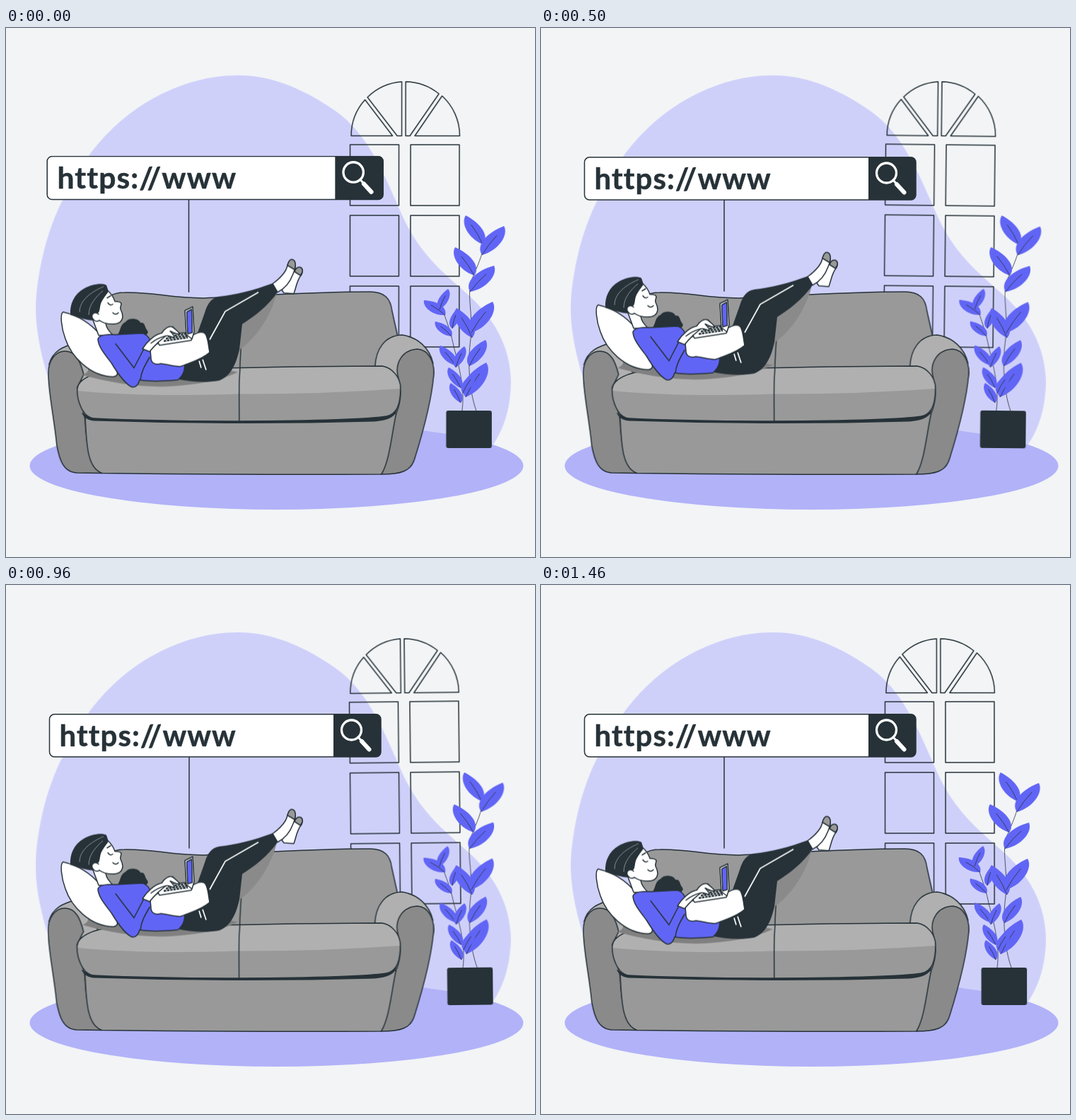
Animation of 748x748 px, one loop 1.5 s. Source, as an HTML page:

```html
<!DOCTYPE html>
<html lang="en">
<head>
<meta charset="utf-8">
<title>Browsing on the sofa</title>
<style>
  html, body { margin: 0; width: 100%; height: 100%; overflow: hidden; background: #f2f4f6; }
  svg { display: block; width: 100vw; height: 100vh; }

  .ink { stroke: #263238; stroke-width: 1.5; stroke-linejoin: round; stroke-linecap: round; }
  .none { fill: none; }
  .dark { fill: #263238; }
  .white { fill: #fff; }
  .violet { fill: #6165f5; }
  .grey { fill: #999; }
  .pale { fill: #b0b0b0; }
  .side { fill: #8a8a8a; }
  .shade { fill: #808080; }
  .vein { fill: none; stroke: #263238; stroke-width: .8; }
  .url { font: 700 42px Lato, "Open Sans", sans-serif; letter-spacing: 1.1px; font-variant-ligatures: none; fill: #263238; stroke: #263238; stroke-width: .5; stroke-linejoin: round; }

  .shake, .float, .beat, .sway { animation: 1.5s linear -20ms infinite; }
  .shake { animation-name: shake; }
  .float { animation-name: float; }
  .beat { animation-name: beat; transform-origin: 296px 277px; }
  .sway { animation-name: sway; }
  #window { transform-origin: 564px 264px; }
  #plant { transform-origin: 647px 430px; }

  @keyframes shake {
    0%, 100% { transform: translateX(0); }
    10%, 90% { transform: translateX(-1.5px); }
    20%, 80% { transform: translateX(3px); }
    30%, 50%, 70% { transform: translateX(-6px); }
    40%, 60% { transform: translateX(6px); }
  }
  @keyframes float {
    0%, 100% { transform: translateY(0); }
    50% { transform: translateY(-15px); }
  }
  @keyframes beat {
    0%, 30%, 40%, 60%, 100% { transform: scale(1); }
    10%, 50% { transform: scale(1.1); }
  }
  @keyframes sway {
    0%, 100% { transform: rotate(0deg); }
    25% { transform: rotate(1deg); }
    75% { transform: rotate(-1deg); }
  }
</style>
</head>
<body>
<svg viewBox="0 0 748 748">
  <path class="shake" fill="#cfd0fa" d="M327 67C377 66 426 89 467 118C515 152 538 215 559 262C584 318 615 343 650 374C690 408 714 452 714 500C714 540 703 570 685 595L110 600C70 540 43 460 42 395C44 345 58 285 82 240C90 223 100 205 112 188C165 110 250 67 327 67Z"/>
  <ellipse cx="382.5" cy="619" rx="349" ry="62" fill="#b1b2f8"/>

  <g id="window" class="sway ink none">
    <path d="M488 152.5A76.5 76.5 0 0 1 507.5 101.5L546.5 152.5Z
      M511 98A76.5 76.5 0 0 1 559.5 76V152.5H553Z
      M565 76A76.5 76.5 0 0 1 612 93L571 152.5H565Z
      M616.5 96A76.5 76.5 0 0 1 641.5 152.5H578Z"/>
  </g>

  <g class="beat">
    <path class="ink none" d="M259 243V372"/>
    <rect class="ink white" x="61.5" y="182.8" width="468.5" height="60.2" rx="7"/>
    <path class="dark" d="M463 182.8H523Q530 182.8 530 190V236Q530 243 523 243H463Z"/>
    <text class="url" x="75.5" y="227.5">https://www</text>
    <g fill="none" stroke="#fff" stroke-linecap="round">
      <circle cx="488.5" cy="205" r="14" stroke-width="3.3"/>
      <path d="M498 215L504 222" stroke-width="3"/>
      <path d="M503 221L513.5 232.5" stroke-width="6"/>
    </g>
  </g>

  <g id="plant" class="sway">
    <path class="vein" d="M665 541C654 510 653 470 657 440C661 400 649 372 661 350C669 330 677 315 675 295"/>
    <path class="vein" d="M645 541C649 510 641 480 633 450C627 420 619 408 615 388"/>
    <rect class="dark" x="622.5" y="541" width="64.5" height="53" rx="3"/>
  </g>

  <g class="shake">
    <path class="ink grey" d="M110 500L135 400C140 380 150 374 168 374C210 373 230 382 280 382C350 379 430 373 515 373C535 373 544 382 546 400L554 436L556 490Z"/>
    <path class="ink pale" d="M61 476C66 456 82 450 100 445C112 452 125 470 130 488L105 500Z"/>
    <path class="ink pale" d="M522 479C523 455 535 435 560 434C582 437 599 452 604 474L590 500L556 500Z"/>
    <path class="ink side" d="M60 488C60 470 70 457 84 457C100 457 106 474 110 490L101 508C103 530 112 545 112 555C114 590 118 620 136 629.5L100 629C82 628 76 612 72 590C68 550 60 515 60 488Z"/>
    <path class="ink grey" d="M112 548C114 585 114 622 136 629.5Q330 632 531 631C542 618 547 580 552 545Z"/>
    <path class="ink side" d="M555 495C549 475 560 455 582 454C598 455 606 472 605 490C602 527 588 577 578 609C573 627 558 631 531 631C543 612 546 570 552 545C560 525 559 508 555 495Z"/>
    <path class="dark" d="M107 544C111 552 117 555 125 555.5Q330 562 520 556.5C540 555 552 550 553 538L545 547Q520 553 330 555L125 552Z"/>
    <path id="seat" class="grey" d="M101 510C102 496 125 487 150 484C240 483 390 478 532 478C546 480 558 494 558 509C558 530 554 546 538 549Q500 555 330 556Q210 556 125 552C108 551 100 525 101 510Z"/>
    <path class="pale" d="M101 513C102 496 125 487 150 484C240 483 390 478 532 478C546 480 557 494 558 510Q445 518 330 517.5Q200 522 101 513Z"/>
    <use href="#seat" class="ink" fill-opacity="0"/>
    <path class="ink none" d="M334 390C335 430 331 460 331 483C329 505 330 530 330 556"/>
  </g>

  <g class="float">
    <path class="shade" d="M108 465C117 478 121 486 108 491C150 503 200 510 240 506.5C270 504 300 500 328 487L250 470Z"/>
    <path class="side" d="M383 374C378 398 358 438 326 458L330 405Z"/>
    <path class="ink white" d="M81 402C76 404 78 424 84 440C92 464 118 493 152 493.5C160 492 158 487 154 478L133 434C118 416 98 406 81 402Z"/>

    <path class="dark" d="M158 434C163 426 161 420 169 416C174 409 188 411 190 417C197 416 196 423 199 427C204 432 197 437 192 433L180 440Z"/>
    <path class="ink white" d="M121 408L131 435L152 435C146 430 142 425 141 418L146 412Z"/>
    <path class="ink white" d="M128 375L143 371C149 376 152 381 154 387C158 387 162 387 163 390C163 393 161 395 162 398C164 402 165 405 165 409C164 416 158 419 151 419C144 419 136 417 131 413L122 404Z"/>
    <path class="dark" d="M91 406C90 391 96 377 110 369C120 363 136 360 142 364L145 373C141 379 134 386 133 395C132 402 131 405 127 403C121 402 121 409 125 414C114 414 101 409 91 406Z"/>
    <path d="M104 402C104 386 119 374 138 366M117 406C117 391 128 380 137 372" fill="none" stroke="#8a8f93" stroke-width="1"/>
    <path class="ink white" d="M131 405C126 401 120 404 122 410C124 415 128 416 132 414"/>
    <path class="ink none" d="M144 389C146 392 148 393 151 391M143 382L148 379M151 403C154 406 157 405 159 403"/>

    <path class="dark" d="M250 474L243 497C262 501 284 502 301 499C316 494 325 478 330 455L334 419C350 409 370 394 384 374L378 361C351 371 323 378 302 380C290 382 285 390 281 403L270 434L286 445Z"/>
    <path d="M288 441L310 401L357 374M273 471L276 481M278 469L283 484" fill="none" stroke="#fff" stroke-width="1.7"/>
    <path class="ink white" d="M390 371L393 375L407 376C411 365 411 357 418 349C421 342 418 337 413 339C408 341 405 347 402 354Z"/>
    <path class="ink grey" d="M408 345C410 339 414 337 418 340C420 343 419 347 416 350Z"/>
    <path class="ink white" d="M377 362C388 354 396 346 398 336C400 329 404 325 408 330C411 336 408 343 406 348C402 359 394 369 384 374Z"/>
    <path class="ink grey" d="M398 336C400 328 404 325 408 330C410 334 409 339 408 342Z"/>

    <path class="ink violet" d="M130 440C132 434 145 433 155 434L192 432C200 433 203 440 207 448L252 474C254 484 250 492 243 498C222 500 200 500 189 498C187 505 184 509 178 508C169 504 158 489 149 474C139 461 130 450 130 440Z"/>
    <path class="ink none" d="M155 447L181 481L196 452M190 498C191 487 196 478 203 466"/>

    <path class="ink white" d="M204 446C203 454 205 462 205 468C206 475 212 477 219 475C229 476 238 479 247 479C258 474 276 470 288 459C286 449 286 440 282 433C278 428 270 431 262 436C246 443 226 449 204 446Z"/>
    <path class="ink white" d="M193 454C199 444 211 433 220 432C224 425 231 422 236 423L246 433L226 437C219 441 212 447 203 458Z"/>
    <path class="ink white" d="M215 445L229 433L258 431L264 435L262 442L217 449Z"/>
    <path d="M223 443L257 438M226 439.5L257 435.5M229 436.5L255 433" fill="none" stroke="#263238" stroke-width="2.4" stroke-dasharray="3.6 1"/>
    <path class="ink white" d="M253 400L264 394.5L266 430L263 440L255 434Z"/>
    <path class="ink violet" d="M255.5 402L262.5 398L263.5 431L257 433Z"/>
    <path class="ink white" d="M220 432C224 426 230 421 235 423C239 426 243 429 246 433C240 434 236 430 232 429C236 433 238 435 238 438C232 437 229 434 225 436C217 438 210 442 205 446"/>
  </g>
</svg>
<script>
  const NS = 'http://www.w3.org/2000/svg';
  const add = (parent, name, attrs) => {
    const el = document.createElementNS(NS, name);
    for (const key in attrs) el.setAttribute(key, attrs[key]);
    parent.appendChild(el);
  };

  const frame = document.getElementById('window');
  for (const y of [165, 265, 365])
    for (const x of [486.5, 572])
      add(frame, 'rect', { x, y, width: 69, height: 86 });

  // Leaves: base x, base y, tip x, tip y
  const leaves = [
    [674, 306, 650, 265], [673, 321, 704, 280], [662, 350, 635, 310],
    [656, 373, 690, 336], [659, 438, 637, 396], [658, 431, 688, 387],
    [655, 478, 678, 441], [650, 522, 679, 473], [621, 406, 591, 385],
    [613, 398, 625, 369], [630, 436, 607, 415], [631, 425, 638, 397],
    [635, 477, 614, 449], [636, 480, 648, 450], [643, 509, 626, 480],
    [646, 516, 662, 488], [643, 530, 629, 502]
  ];
  const plant = document.getElementById('plant');
  for (const [x, y, tx, ty] of leaves) {
    const dx = tx - x, dy = ty - y, side = dx < 0 ? -1 : 1;
    const at = (u, v) => `${x + dx * u - dy * v * side} ${y + dy * u + dx * v * side}`;
    add(plant, 'path', {
      class: 'violet',
      d: `M${at(0, 0)}C${at(.1, -.3)} ${at(.55, -.28)} ${at(1, 0)}C${at(.9, .24)} ${at(.4, .3)} ${at(0, 0)}Z`
    });
    add(plant, 'path', { class: 'vein', d: `M${at(0, 0)}Q${at(.35, -.04)} ${at(.68, 0)}` });
  }
</script>
</body>
</html>
```
